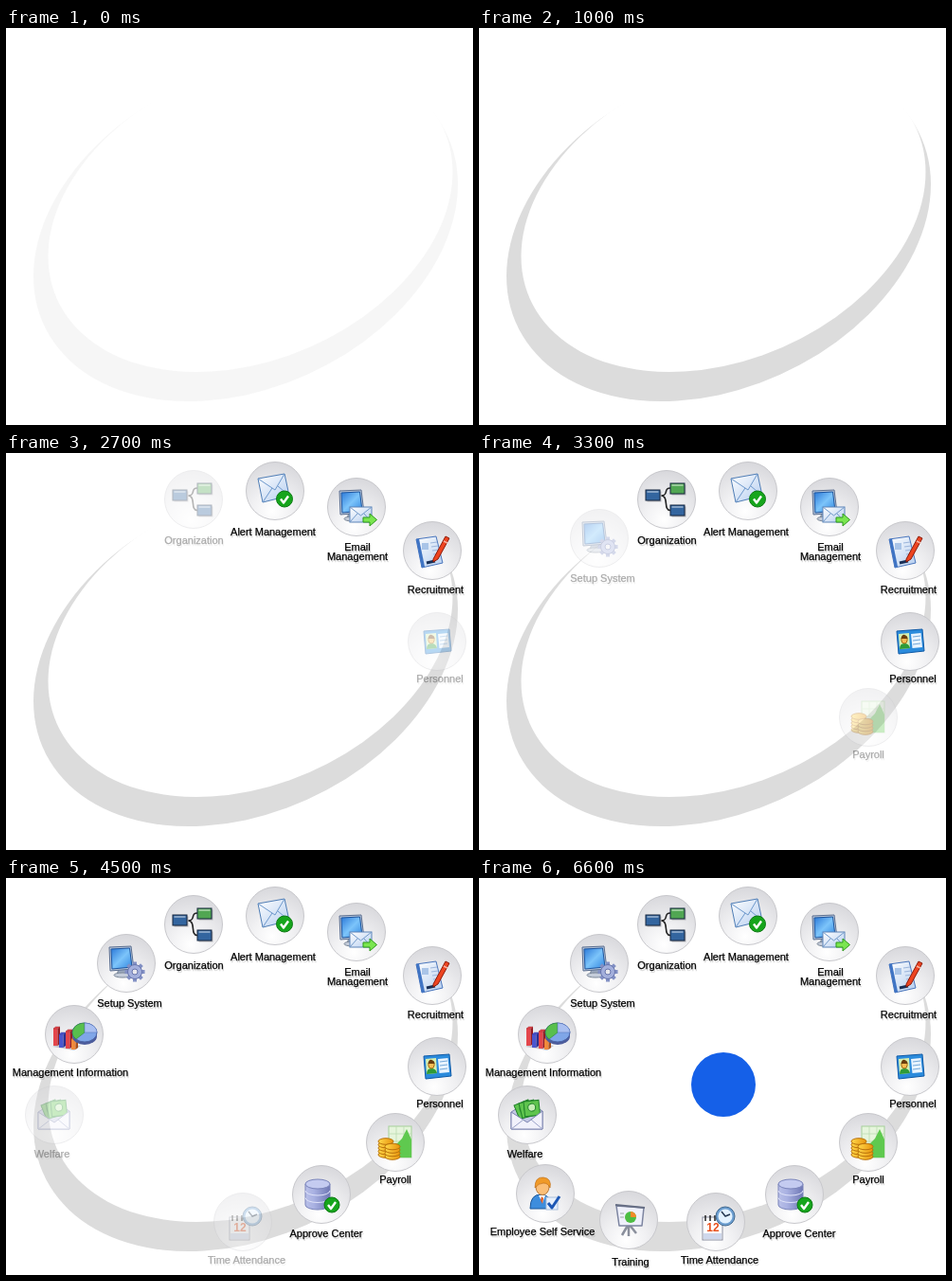
Animation, 493 px wide and 419 px high, one loop 8 s. Source, as an HTML page:

```html
<!DOCTYPE html>
<html lang="en">
<head>
<meta charset="utf-8">
<title>Module wheel</title>
<style>
  html, body { margin: 0; width: 100%; height: 100%; overflow: hidden; background: #fff; }
  svg { display: block; }
  .label { font: 11px "Liberation Sans", Arial, sans-serif; text-anchor: middle; stroke: #000; stroke-width: .25px; }
  .shade { fill: #999; stroke: #999; opacity: .35; }
  .day { font: bold 12px "Liberation Sans", Arial, sans-serif; text-anchor: middle; fill: #e8501c; }
</style>
</head>
<body>
<svg id="stage" width="493" height="419" viewBox="0 0 493 419">
  <defs>
    <radialGradient id="disc" cx=".45" cy=".85" r=".85">
      <stop offset="0" stop-color="#fff"/><stop offset=".4" stop-color="#f1f1f3"/><stop offset="1" stop-color="#d8d8dc"/>
    </radialGradient>
    <linearGradient id="screen" x2="1" y2="1">
      <stop offset="0" stop-color="#2a78d8"/><stop offset=".5" stop-color="#7cc4fa"/><stop offset="1" stop-color="#2f86e0"/>
    </linearGradient>
    <linearGradient id="paper" x2="1" y2="1">
      <stop offset="0" stop-color="#fff"/><stop offset="1" stop-color="#b4cdef"/>
    </linearGradient>
    <linearGradient id="drum">
      <stop offset="0" stop-color="#b9c0e8"/><stop offset=".35" stop-color="#a9b1e2"/><stop offset="1" stop-color="#6f78b4"/>
    </linearGradient>
    <linearGradient id="gold">
      <stop offset="0" stop-color="#ffd84a"/><stop offset="1" stop-color="#e8930c"/>
    </linearGradient>
  </defs>
  <circle id="ring" r="1" fill="#dcdcdc" transform="matrix(224 -48.5 0 173.9 253 213.5)"/>
  <circle r="1" fill="#fff" transform="matrix(213.5 -44.5 0 160.4 258 196.5)"/>
  <g id="modules"></g>
  <circle id="emblem" cx="258" cy="218" r="34" fill="#1560e8"/>
</svg>
<script>
const LOOP = 8000;

const path = (d, fill, stroke = 'none', width = 1) =>
  `<path d="${d}" fill="${fill}" stroke="${stroke}" stroke-width="${width}" stroke-linejoin="round"/>`;
const rect = (x, y, w, h, fill, stroke = 'none') =>
  `<rect x="${x}" y="${y}" width="${w}" height="${h}" fill="${fill}" stroke="${stroke}"/>`;
const oval = (x, y, rx, ry, fill, stroke = 'none') =>
  `<ellipse cx="${x}" cy="${y}" rx="${rx}" ry="${ry}" fill="${fill}" stroke="${stroke}"/>`;
const line = (d, stroke, width = 1) => path(d, 'none', stroke, width);
const repeat = (n, draw) => Array.from({ length: n }, (_, i) => draw(i)).join('');

const tick = (x, y, r) => oval(x, y, r, r, '#16a51c', '#0b7a12') +
  line(`M${x - 4} ${y}l3 4l5 -7`, '#fff', 2.4);
const monitor = () =>
  path('M-8 6h7l2 6h-11z', '#9aa8be', '#7b8798') + oval(-4, 12.5, 9, 2.5, '#c5cdda', '#7b8798') +
  path('M-18 -17L5 -18L8 6L-17 8z', '#b4c3d8', '#5c6f90') +
  path('M-16 -15L3.5 -16L6 4L-15 6z', 'url(#screen)', '#1c559f');
const gear = (x, y) => repeat(8, i =>
  `<rect x="-2" y="-10.5" width="4" height="6" fill="#8290c4" transform="translate(${x} ${y}) rotate(${i * 45})"/>`) +
  oval(x, y, 7.5, 7.5, '#a3afdc', '#6774ac') + oval(x, y, 3, 3, '#e8e8ee', '#6774ac');
const node = (x, y, fill) => rect(x + 1.5, y + 1.5, 15, 11, '#b5b5ba') +
  rect(x, y, 15, 11, fill, '#17273f') + line(`M${x + 1.5} ${y + 2}h12`, '#ffffff66', 2);
const bar = (x, y, h, light, dark) => rect(x, y, 4.5, h, light) +
  path(`M${x + 4.5} ${y}l2.5 -2v${h}l-2.5 2z`, dark) + path(`M${x} ${y}l2.5 -2h4.5l-2.5 2z`, light, dark, .4);
const coins = (x, base, n) => repeat(n, i => oval(x, base - i * 3.5, 8, 3.3, 'url(#gold)', '#b8700a'));

const icons = {
  email: monitor() + rect(-7, 0, 23, 16, 'url(#paper)', '#5d84b8') +
    line('M-7 0L4.5 9L16 0M-7 16L1 7M16 16L8 7', '#7199c9') +
    path('M7 11h7v-4l7.5 6.5l-7.5 6.5v-4h-7z', '#7be650', '#2f9a1c'),
  alert: path('M-18 -13L10 -18L15 5L-13 12z', 'url(#paper)', '#4f7db5') +
    line('M-18 -13L0 -1L10 -18M-13 12L-3 -3M15 5L3 -5', '#6d98cc') + tick(10, 8.5, 8.5),
  organization: line('M-6 -4C3 -4 -4 -12 4 -12M-6 -4C3 -4 -4 11.5 4 11.5', '#222', 1.6) +
    node(-22, -10, '#33659f') + node(4, -17, '#51a653') + node(4, 6, '#33659f'),
  recruitment: path('M-17 -12L4 -15L11 13L-11 18z', 'url(#paper)', '#4a76bd') +
    path('M-17 -12L-14 -12.5L-8 17L-11 18z', '#3f74c4') + rect(-11, -8, 7, 7, '#a9c4e8') +
    repeat(4, i => line(`M${-2 + i} ${-8 + i * 4}l7 -1`, '#9db6dc', 1.2)) +
    line('M-6 13l9 -2', '#182f57', 3) +
    path('M1 9L14 -15L18 -13L6 9L1 12z', '#ee4420', '#8d1c0b') + line('M12 -10l4 2', '#f6b29f', 1.5),
  personnel: path('M-14 -11L13 -13L15 10L-12 13z', '#2b8bdc', '#0f5aa6') +
    path('M1 -8L11.500 -9L13 6L2.500 7z', '#e9f4ff') +
    repeat(3, i => line(`M3 ${-5 + i * 4}l8 -1`, '#75a9d9', 1.2)) +
    path('M-12 -8L-1 -9L0 7L-11 8z', '#d8f0b0') + path('M-11 8q0 -6 5 -6t6 5z', '#2f9b38') +
    oval(-6, -2, 3.2, 4, '#f6bd55', '#a86a10') + path('M-9.5 -3q1 -5 4 -4t3 4z', '#6b3d0d'),
  payroll: rect(-7, -17, 24, 33, '#e6f5dc', '#a5cf9a') +
    line('M-7 -9h24M-7 -1h24M-7 7h24M1 -17v33M9 -17v33', '#bcdcb2', .8) +
    path('M-5 16V4L2 1L7 -4L12 -14L17 -3V16z', '#5fc94f') +
    coins(-10, 13, 5) + coins(-3, 15, 4),
  approve: path('M-17 -11V11a13 5 0 0 0 26 0V-11z', 'url(#drum)', '#7a84ba') +
    line('M-17 -4a13 5 0 0 0 26 0M-17 3.5a13 5 0 0 0 26 0', '#dfe3fa') +
    oval(-4, -11, 13, 5, '#c4cbf0', '#7a84ba') + tick(11, 11, 8),
  time: rect(-14, -5, 21, 24, '#fff', '#8a8ea0') + path('M-13 12h19v6h-19z', '#cfd8ec') +
    repeat(4, i => line(`M${-11 + i * 5} -7v6`, '#222', 1.5)) +
    '<text class="day" x="-3" y="10">12</text>' +
    oval(10, -6, 10, 10, '#6d9fd1', '#41698f') + oval(10, -6, 7.5, 7.5, '#e3f2ff') +
    line('M6 -11L10 -6L15 -8', '#23364f', 1.5),
  training: line('M0 4L-7 16M0 4L8 14M0 4V17', '#8a8f9c', 2.5) +
    path('M-13 -15L16 -13L14 6L-10 6z', '#eef0fa', '#7c84a0', 1.5) + line('M-14 -16L17 -13', '#666e84', 2) +
    oval(2, -3, 6, 6, '#4dbd43') + path('M2 -3V-9A6 6 0 0 1 8 -3z', '#f38a29') + line('M-9 -7h4M-9 -3h4', '#a0a8ac'),
  employee: path('M-16 16Q-16 1 -5 1T9 16z', '#3d8ddd', '#1d5798') + path('M-7 2h7l-3 8z', '#fff') +
    path('M-4 3l2 2l-1 6l-2 -4z', '#e05b22') + oval(-3, -7, 7, 8.5, '#fbbf78', '#bb7b39') +
    path('M-11 -6Q-11 -18 -2 -17T5 -6Q3 -11 -2 -11T-11 -6z', '#f09a28', '#b8640c', .6) +
    rect(1, 4, 12, 13, '#e8f0fc', '#a9bfdc') + line('M3 10l4 5l8 -12', '#1e58b5', 3),
  welfare: path('M-17 -3L0 -14L16 -4V15H-17z', '#c4c8e4', '#7c84b0') +
    repeat(3, i => `<g transform="translate(${-14 + i * 5} ${-10 - i * 2}) rotate(${-22 + i * 8})">` +
      rect(0, 0, 16, 16, '#5fc44e', '#20822a') + oval(8, 7, 4, 4, '#c7edb7', '#20822a') + '</g>') +
    path('M-17 -3L0 8L16 -4V15H-17z', '#f1f1fb', '#7c84b0') + line('M-17 15L-4 5M16 15L4 5', '#9aa2c8'),
  information: path('M-23 13L0 17L7 12L-15 9z', '#c8c8cf') +
    bar(-22, -6, 18, '#e4464c', '#951b22') + bar(-16, 0, 14, '#4a56cf', '#2a2f90') +
    bar(-9, -3, 18, '#e4464c', '#951b22') + bar(-3, 5, 11, '#f08a3c', '#a9501c') +
    path('M-2 -2v4a13 9 0 0 0 26 0v-4z', '#4c5c9c') + oval(11, -2, 13, 10, '#7fa6e8', '#4c66a8') +
    path('M11 -2L2 5A13 10 0 0 1 11 -12z', '#58bf4d', '#2c8a33', .6) +
    path('M11 -2V-12A13 10 0 0 1 24 -2z', '#a9bff0', '#5f7cc0', .6),
  setup: monitor() + gear(9, 9)
};

// icon, disc centre, label centre, label baseline, label lines, fade start
const modules = [
  ['email', 370, 57, 371, 103, 'Email|Management', 1200],
  ['alert', 284, 40, 282, 87, 'Alert Management', 2100],
  ['recruitment', 450, 103, 453.5, 148, 'Recruitment', 2100],
  ['organization', 198, 49, 198.5, 96, 'Organization', 2700],
  ['personnel', 455, 199, 458, 242, 'Personnel', 2700],
  ['setup', 127, 90, 130.5, 136, 'Setup System', 3300],
  ['payroll', 411, 279, 411, 322, 'Payroll', 3300],
  ['information', 72, 165, 68, 209, 'Management Information', 3900],
  ['approve', 333, 334, 338, 379, 'Approve Center', 3900],
  ['welfare', 51, 250, 48.5, 295, 'Welfare', 4500],
  ['time', 250, 363, 254, 407, 'Time Attendance', 4500],
  ['employee', 70, 333, 67, 377, 'Employee Self Service', 5100],
  ['training', 158, 361, 160, 409, 'Training', 5100]
];

const label = (x, y, text) =>
  `<text class="label shade" x="${x + 1}" y="${y + 1.5}">${text}</text><text class="label" x="${x}" y="${y}">${text}</text>`;

const holder = document.getElementById('modules');
holder.innerHTML = modules.map(([icon, x, y, labelX, baseline, text]) =>
  `<g><g transform="translate(${x} ${y})">` +
  `<circle r="30.5" fill="url(#disc)" stroke="#c8c8cc"/>${icons[icon]}</g>` +
  text.split('|').map((part, i) => label(labelX, baseline + i * 10, part)).join('') + '</g>').join('');

// Each part gains an equal share of opacity at every listed time.
const fades = [
  [document.getElementById('ring'), [0, 600, 800, 1000]],
  [document.getElementById('emblem'), [5700, 6000, 6300, 6600]],
  ...modules.map((module, i) => {
    const start = module[6];
    return [holder.children[i], [start, start + 300, start + 600]];
  })
];

function draw() {
  const time = performance.now() % LOOP;
  for (const [part, times] of fades)
    part.setAttribute('opacity', times.filter(at => at <= time).length / times.length);
  requestAnimationFrame(draw);
}
draw();
</script>
</body>
</html>
```
